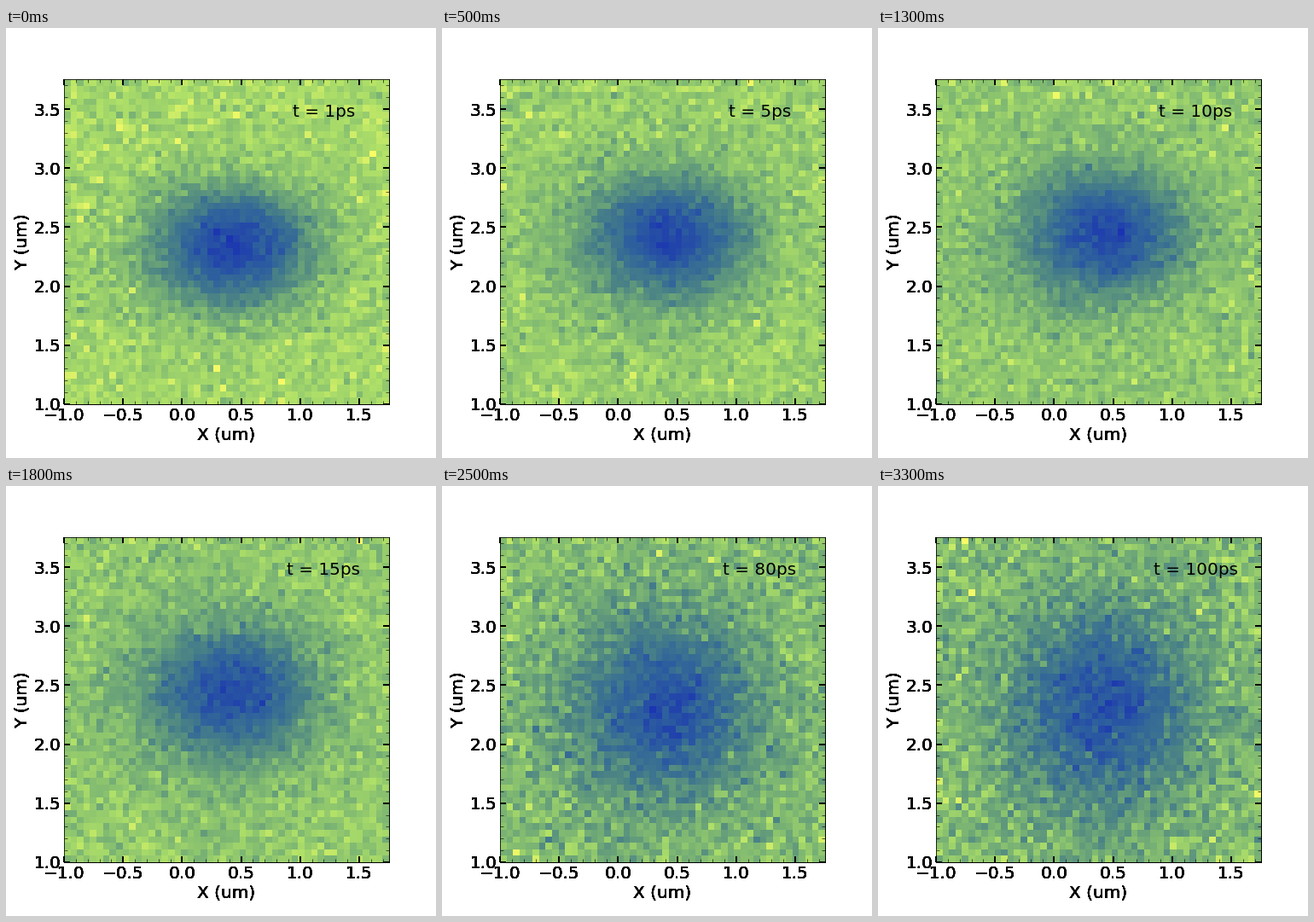
Recreate the animation shown at these times as a matplotlib script. Size 504x504 px, loop 3500 ms.

```python
import numpy as np
import matplotlib.pyplot as plt
from matplotlib.animation import FuncAnimation
from matplotlib.colors import LinearSegmentedColormap
from matplotlib.ticker import AutoMinorLocator, MultipleLocator

SIZE, DPI, CELLS = 504, 72, 50
X0, X1, Y0, Y1 = -1.0, 1.75, 1.0, 3.75
SIDE = 380.52 / SIZE
BOX = [0.135, 0.88 - SIDE, SIDE, SIDE]
LABEL_LAYERS = 8  # stacked labels give the heavy text edges
TIMES = [1, 5, 10, 15, 40, 80, 100]  # ps

plt.rcParams.update({"font.family": "DejaVu Sans", "font.size": 20})

CMAP = LinearSegmentedColormap.from_list("blue_lime", [
    "#1a33b3", "#2449a9", "#2d5e9f", "#396f93", "#4b8386",
    "#659e7a", "#86bf70", "#b0e168", "#ffff66"])

cell = (X1 - X0) / CELLS
gx, gy = np.meshgrid(X0 + cell * (np.arange(CELLS) + 0.5),
                     Y0 + cell * (np.arange(CELLS) + 0.5))


def bell(cx, cy, sx, sy):
    return np.exp(-((gx - cx) / sx) ** 2 / 2 - ((gy - cy) / sy) ** 2 / 2)


def field(t):
    """Noisy dip that spreads and fades with time, after a brief rise."""
    rng = np.random.default_rng(t)
    cy = 2.31 + 0.14 * t / 12 * np.exp(1 - t / 12)
    sx, sy = 0.42 + 0.0006 * t, 0.31 + 0.002 * t
    core = (0.64 - 0.042 * np.log(t)) * bell(0.45, cy, sx, sy)
    halo = 0.14 * bell(0.25, cy - 0.05, 1.5 * sx, 1.6 * sy)
    noise = rng.normal(0, 0.05 + 0.0003 * t, gx.shape)
    base = 0.845 - 0.02 * np.log(t)
    return np.clip(base - core - halo + noise, 0, 1)


def add_panel(fig, n):
    ax = fig.add_axes(BOX, label=f"panel{n}")
    ax.patch.set_visible(False)
    ax.set(xlim=(X0, X1), ylim=(Y0, Y1), xlabel="X (um)", ylabel="Y (um)")
    for axis in (ax.xaxis, ax.yaxis):
        axis.set_major_locator(MultipleLocator(0.5))
        axis.set_minor_locator(AutoMinorLocator(5))
    ax.tick_params(which="both", direction="in", top=True, right=True)
    ax.tick_params(which="major", length=7, width=2)
    ax.tick_params(which="minor", length=4, width=0.6)
    return ax


fig = plt.figure(figsize=(SIZE / DPI, SIZE / DPI), dpi=DPI, facecolor="white")
for n in range(LABEL_LAYERS):
    ax = add_panel(fig, n)

image = ax.imshow(field(TIMES[0]), cmap=CMAP, vmin=0, vmax=1, origin="lower",
                  extent=(X0, X1, Y0, Y1), aspect="auto",
                  interpolation="nearest")
stamp = ax.text(0.8, 0.9, "", transform=ax.transAxes, ha="center", va="center")


def draw(i):
    image.set_data(field(TIMES[i]))
    stamp.set_text(f"t = {TIMES[i]}ps")
    return image, stamp


anim = FuncAnimation(fig, draw, frames=len(TIMES), interval=500,
                     repeat=True, repeat_delay=0)
plt.show()
```
